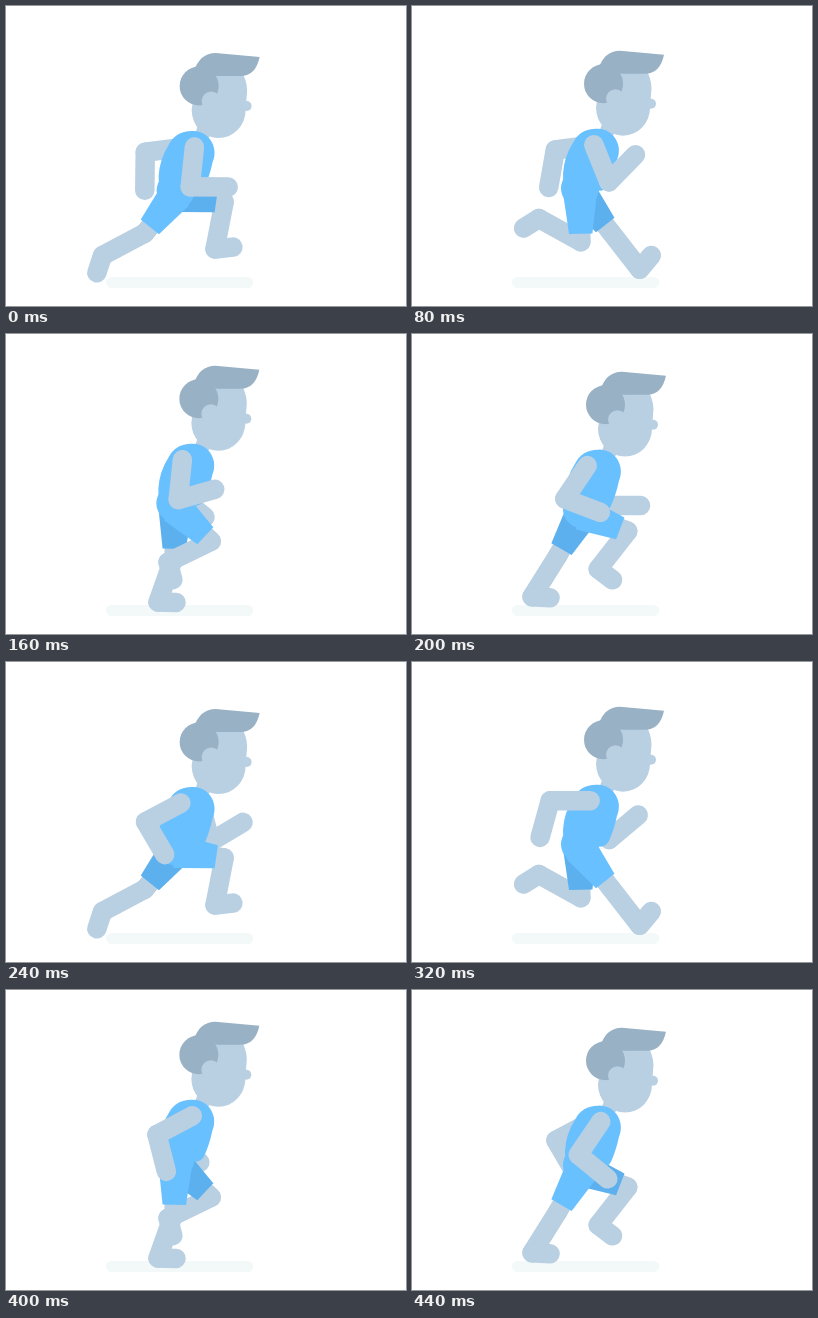
An HTML page without scripts that plays this animation: 400 px wide and 300 px high, repeating every 480 ms.

```html
<!DOCTYPE html>
<html lang="en">
<head>
<meta charset="utf-8">
<title>Runner</title>
<style>
  @property --phase { syntax: "<angle>"; inherits: true; initial-value: 0deg; }
  @property --thigh { syntax: "<angle>"; inherits: true; initial-value: 90deg; }
  @property --shin { syntax: "<angle>"; inherits: true; initial-value: 90deg; }
  @property --foot { syntax: "<angle>"; inherits: true; initial-value: 0deg; }

  html, body { margin: 0; width: 100%; height: 100%; overflow: hidden; background: #fff; }
  svg { display: block; width: 100%; height: 100%; animation: cycle 480ms steps(12) infinite; }
  @keyframes cycle { from { --phase: 0deg; } to { --phase: 360deg; } }

  /* The body bobs twice per stride. */
  .runner {
    transform: translate(calc(-1px * cos(2 * var(--phase) - 130deg)),
                         calc(9.5px * cos(2 * var(--phase) - 52deg) - 5.8px));
  }

  /* Arms swing like pendulums; the forearm trails the upper arm. */
  .arm { transform: translate(calc(var(--x) + var(--sway) * cos(var(--phase) + 15deg)), 141px); }
  .near.arm { --x: 181px; --sway: 7px; --swing: var(--phase); }
  .far.arm { --x: 186px; --sway: -8px; --swing: calc(var(--phase) - 150deg); }
  .upper, .fore {
    --upper: calc(124deg - 56deg * cos(var(--swing) - 60deg));
    --fore: calc(30deg - 76deg * cos(var(--swing) - 67deg));
  }
  .upper { transform: rotate(var(--upper)); }
  .fore { transform: translate(40px) rotate(calc(var(--fore) - var(--upper))); }

  /* Both legs share one stride, half a cycle apart; angles run clockwise from the right. */
  .leg { transform: translate(169px, 189px); fill: #69c0ff; animation: stride 480ms infinite; }
  .far.leg { fill: #5cb0ee; animation-delay: -240ms; }
  .thigh { transform: rotate(var(--thigh)); }
  .shin { transform: translate(49px) rotate(calc(var(--shin) - var(--thigh))); }
  .foot { transform: translate(48px) rotate(calc(var(--foot) - var(--shin))); }
  @keyframes stride {
    0%, 100% { --thigh: 129deg; --shin: 152deg; --foot: 108deg; animation-timing-function: steps(2); }
    16.6667% { --thigh: 89deg; --shin: 209deg; --foot: 148deg; animation-timing-function: steps(1); }
    25%      { --thigh: 65deg; --shin: 180deg; --foot: 112deg; animation-timing-function: steps(2); }
    41.6667% { --thigh: 21deg; --shin: 128deg; --foot: 37deg; animation-timing-function: steps(1); }
    50%      { --thigh: 8deg; --shin: 101deg; --foot: -6deg; animation-timing-function: steps(2); }
    66.6667% { --thigh: 52deg; --shin: 52deg; --foot: -50deg; animation-timing-function: steps(1); }
    75%      { --thigh: 63deg; --shin: 97deg; --foot: 0deg; animation-timing-function: steps(2); }
    91.6667% { --thigh: 120deg; --shin: 122deg; --foot: 3deg; animation-timing-function: steps(1); }
  }

  .bone { stroke: #b9cfe2; stroke-width: 19.5; stroke-linecap: round; }
  .skin { fill: #b9cfe2; }
  .hair { fill: #98b1c5; }
  .shirt { fill: #69c0ff; }
</style>
</head>
<body>
<svg viewBox="0 0 400 300">
  <defs>
    <g id="arm">
      <g class="upper">
        <path class="bone" d="M0 0H40"/>
        <g class="fore"><path class="bone" d="M0 0H38"/></g>
      </g>
    </g>
    <g id="leg">
      <g class="thigh">
        <path class="bone" d="M0 0H49"/>
        <g class="shin">
          <path class="bone" d="M0 0H48"/>
          <g class="foot"><path class="bone" d="M0 0H18"/></g>
        </g>
        <path d="M0 -17L41 -11.7V11.7L0 17Z"/>
      </g>
    </g>
  </defs>

  <rect x="100" y="271" width="147" height="11" rx="5.5" fill="#f3f8f9"/>

  <g class="runner">
    <use href="#arm" class="far arm"/>
    <use href="#leg" class="far leg"/>
    <use href="#leg" class="near leg"/>

    <path class="skin" d="M194 112L184 140H198L208 120Z"/>
    <path class="shirt" d="M162 139Q169 125 185 125A21 22 0 0 1 206 156Q203 170 198 181Q195 187 188 187H160Q151 180 152 170Q153 153 162 139Z"/>
    <circle class="shirt" cx="169" cy="184.500" r="19"/>

    <path class="skin" d="M185 104A27 28 0 0 0 239 104L240.500 84Q240 74 235 66H190Z"/>
    <circle class="skin" cx="240" cy="100" r="5"/>
    <circle class="hair" cx="192.500" cy="80" r="19.500"/>
    <path class="hair" d="M187 66Q193 47 209 47L253 51Q249 70 234 70H211Z"/>
    <circle class="skin" cx="204.500" cy="95" r="9.500"/>

    <use href="#arm" class="near arm"/>
  </g>
</svg>
</body>
</html>
```
